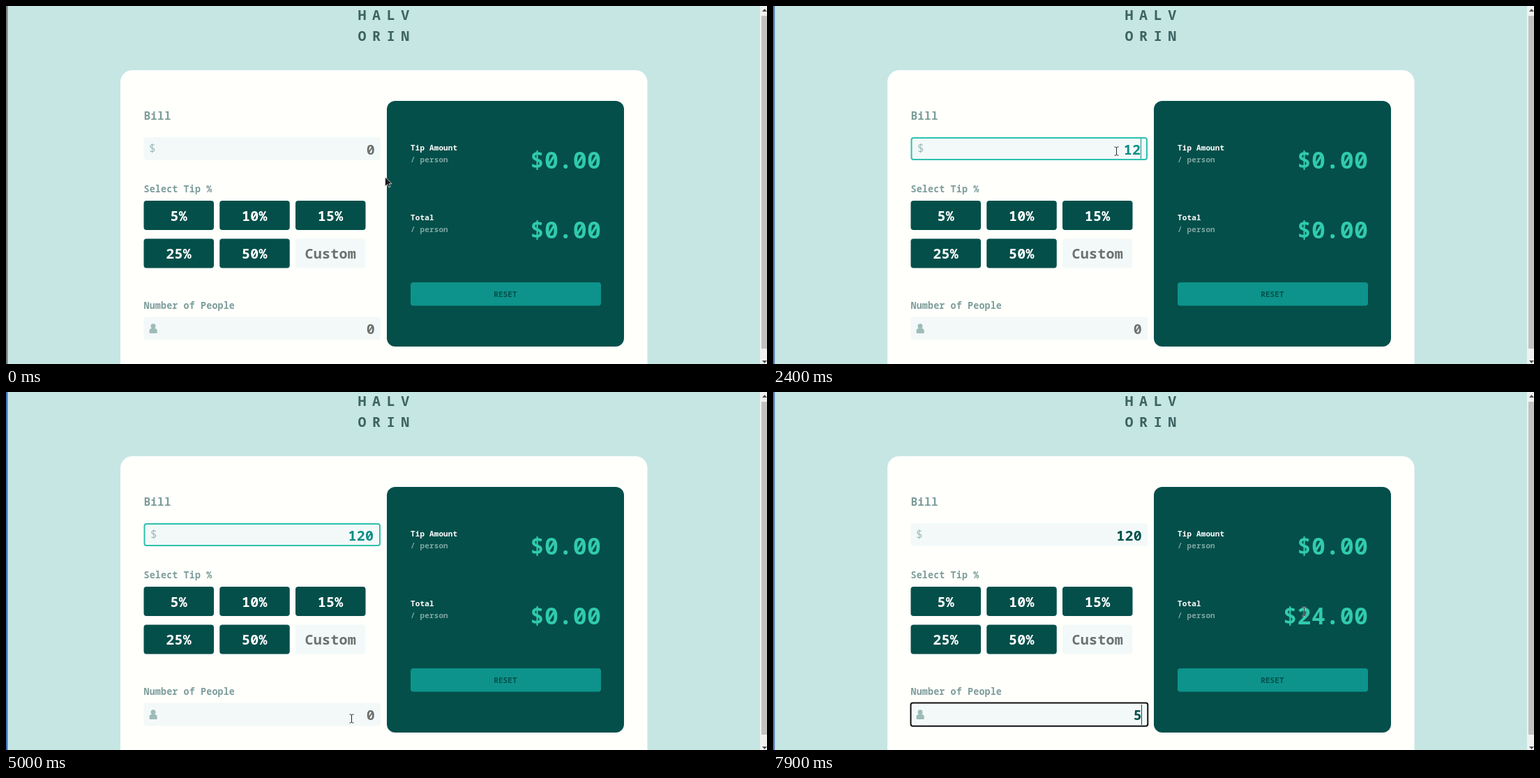
An HTML page for the animation above (8 s loop, 1091 px wide and 513 px high).

```html
<!DOCTYPE html>
<html lang="en">
<head>
<meta charset="utf-8">
<title>Tip calculator</title>
<style>
  html, body { margin: 0; width: 100%; height: 100%; overflow: hidden; background: #c6e6e4; }
  svg { display: block; width: 1091px; height: 513px; }
  text { font: 700 20px "Noto Sans Mono", "DejaVu Sans Mono", monospace; letter-spacing: .012em; }
  .logo { fill: #3b6361; letter-spacing: 8.6px; }
  .label { fill: #7c9d9a; font-size: 13.33px; }
  .small { font-size: 11px; fill: #fff; }
  .dim { fill: #7ea5a1; }
  .amount { font-size: 33.3px; fill: #30cbad; text-anchor: end; }
  .middle { text-anchor: middle; }
  .field { fill: #f3f9f9; }
  .icon { fill: #9dbbb9; }
</style>
</head>
<body>
<svg viewBox="0 0 1091 513">
  <rect id="edge" width="2.5" height="513"/>
  <text class="logo" x="504.5" y="20">HALV</text>
  <text class="logo" x="504.5" y="50">ORIN</text>

  <rect x="164" y="92" width="755.5" height="460" rx="17" fill="#fffffc"/>
  <text class="label" x="197.5" y="163" style="font-size:16px">Bill</text>
  <rect id="billBox" class="field" x="197.5" y="188" width="339.5" height="33" rx="4"/>
  <rect id="billRing" x="198.5" y="189" width="337.5" height="31" rx="3" fill="none" stroke="#2fc1ae" stroke-width="2"/>
  <text id="dollar" class="icon" y="210" style="font-size:16px;font-weight:400">$</text>
  <text id="bill" y="212.5"></text>

  <text class="label" x="197.5" y="267">Select Tip %</text>
  <g id="buttons"></g>

  <text class="label" x="197.5" y="433.5">Number of People</text>
  <rect class="field" x="197.5" y="445.5" width="339.5" height="33" rx="4"/>
  <rect id="peopleRing" x="197.5" y="445.5" width="339.8" height="33.3" rx="3" fill="none" stroke="#101010" stroke-width="2"/>
  <g class="icon">
    <circle cx="211" cy="458.8" r="3.5"/>
    <path d="M205.5 468V465.5Q205.5 462 209 462H213Q216.700 462 216.700 465.500V468Q216.700 469 215.700 469H206.500Q205.500 469 205.500 468Z"/>
  </g>
  <text id="people" x="516.7" y="470"></text>
  <rect id="caret" width="1" height="29"/>

  <rect x="546" y="136" width="340" height="352" rx="12" fill="#044f4a"/>
  <text class="small" x="580" y="207">Tip Amount</text>
  <text class="small dim" x="580" y="224">/ person</text>
  <text class="amount" x="853.5" y="233">$0.00</text>
  <text class="small" x="580" y="307">Total</text>
  <text class="small dim" x="580" y="324">/ person</text>
  <text id="total" class="amount" x="853.5" y="333"></text>
  <rect x="580" y="396" width="273" height="33.5" rx="4" fill="#0d938b"/>
  <text class="small middle" x="716" y="417" style="fill:#044f4a">RESET</text>

  <rect x="1081" width="10" height="513" fill="#f1f1f1"/>
  <rect x="1083" y="14" width="8" height="477" fill="#c1c1c1"/>
  <path d="M1084 8L1087.500 4L1091 8ZM1084 508L1087.500 512L1091 508Z" fill="#505050"/>

  <path id="arrow" d="M0 0V13.500L3.300 10.600L5.500 15L7.600 14L5.500 9.700H9.600Z" fill="#181818" stroke="#fff" stroke-width=".7"/>
  <g id="beam" fill="none">
    <path d="M-3-6H-1L0-5L1-6H3M0-5V5M-3 6H-1L0 5L1 6H3" stroke="#fff" stroke-width="2.4" opacity=".6"/>
    <path d="M-3-6H-1L0-5L1-6H3M0-5V5M-3 6H-1L0 5L1 6H3" stroke="#222"/>
  </g>
</svg>
<script>
const LOOP = 8000, STEP = 100;
const el = id => document.getElementById(id);
const show = (id, on) => el(id).style.display = on ? '' : 'none';
const set = (id, attrs) => Object.entries(attrs).forEach(([k, v]) => el(id).setAttribute(k, v));

el('buttons').innerHTML = ['5%', '10%', '15%', '25%', '50%', 'Custom'].map((name, i) => {
  const x = 197.5 + i % 3 * 108.75, y = i < 3 ? 279 : 333.5, custom = i === 5;
  return `<rect x="${x}" y="${y}" width="100.500" height="42" rx="4" fill="${custom ? '#f3f9f9' : '#044f4a'}"/>
    <text class="middle" x="${x + 50.2}" y="${y + 28.7}" fill="${custom ? '#6c706e' : '#fff'}">${name}</text>`;
}).join('');

// [time, x, y] of the pointer
const path = [
  [0, 543, 245], [500, 543, 245], [800, 492, 208], [4000, 492, 208], [4800, 495, 468],
  [7200, 495, 468], [7600, 744, 365], [7700, 744, 365], [7800, 775, 302], [7900, 761, 315], [LOOP, 761, 315]
];
// the caret toggles at each time, starting hidden
const blinks = [1200, 1700, 2200, 3700, 4300, 5000, 5200, 5800, 6200, 6800, 7300];

function pointer(t) {
  const i = path.findIndex(key => key[0] > t);
  const [t0, x0, y0] = path[i - 1], [t1, x1, y1] = path[i];
  const p = (t - t0) / (t1 - t0), e = p * p * (3 - 2 * p);
  return [x0 + (x1 - x0) * e, y0 + (y1 - y0) * e];
}

function overText(x, y) {
  const inside = (l, t, r, b) => x > l && x < r && y > t && y < b;
  return inside(197, 188, 537, 221) || inside(197, 445, 537, 479) ||
    inside(415, 333, 515, 375) || inside(732, 297, 853, 343);
}

function render(time) {
  const t = Math.floor(time % LOOP / STEP) * STEP;
  const billFocus = t >= 1200 && t < 5200, peopleFocus = t >= 5200;

  set('edge', { fill: t < 1100 ? '#777b7b' : '#4272bd' });

  const bill = t < 2200 ? '0' : '120'.slice(0, t < 2400 ? 1 : t < 3100 ? 2 : 3);
  el('bill').textContent = bill;
  set('bill', {
    x: (billFocus ? 527.2 : 529) - bill.length * 12.24,
    fill: t < 2200 ? '#6c706e' : billFocus ? '#0d8f87' : '#044f4a'
  });
  set('dollar', { x: billFocus ? 207 : 205 });
  show('billRing', billFocus);

  el('people').textContent = t < 6200 ? '0' : '5';
  set('people', { fill: t < 6200 ? '#6c706e' : '#044f4a' });
  show('peopleRing', peopleFocus);
  el('total').textContent = t < 6300 ? '$0.00' : '$24.00';

  show('caret', blinks.filter(b => b <= t).length % 2);
  set('caret', peopleFocus ? { x: 528, y: 448, fill: '#044f4a' } : { x: 527, y: 190, fill: '#0d8f87' });

  const [x, y] = pointer(t), beam = overText(x, y);
  show('beam', beam);
  show('arrow', !beam);
  set(beam ? 'beam' : 'arrow', { transform: `translate(${Math.round(x) + .5} ${Math.round(y)})` });
}

const start = performance.now();
function tick() {
  render(performance.now() - start);
  requestAnimationFrame(tick);
}
tick();
</script>
</body>
</html>
```
